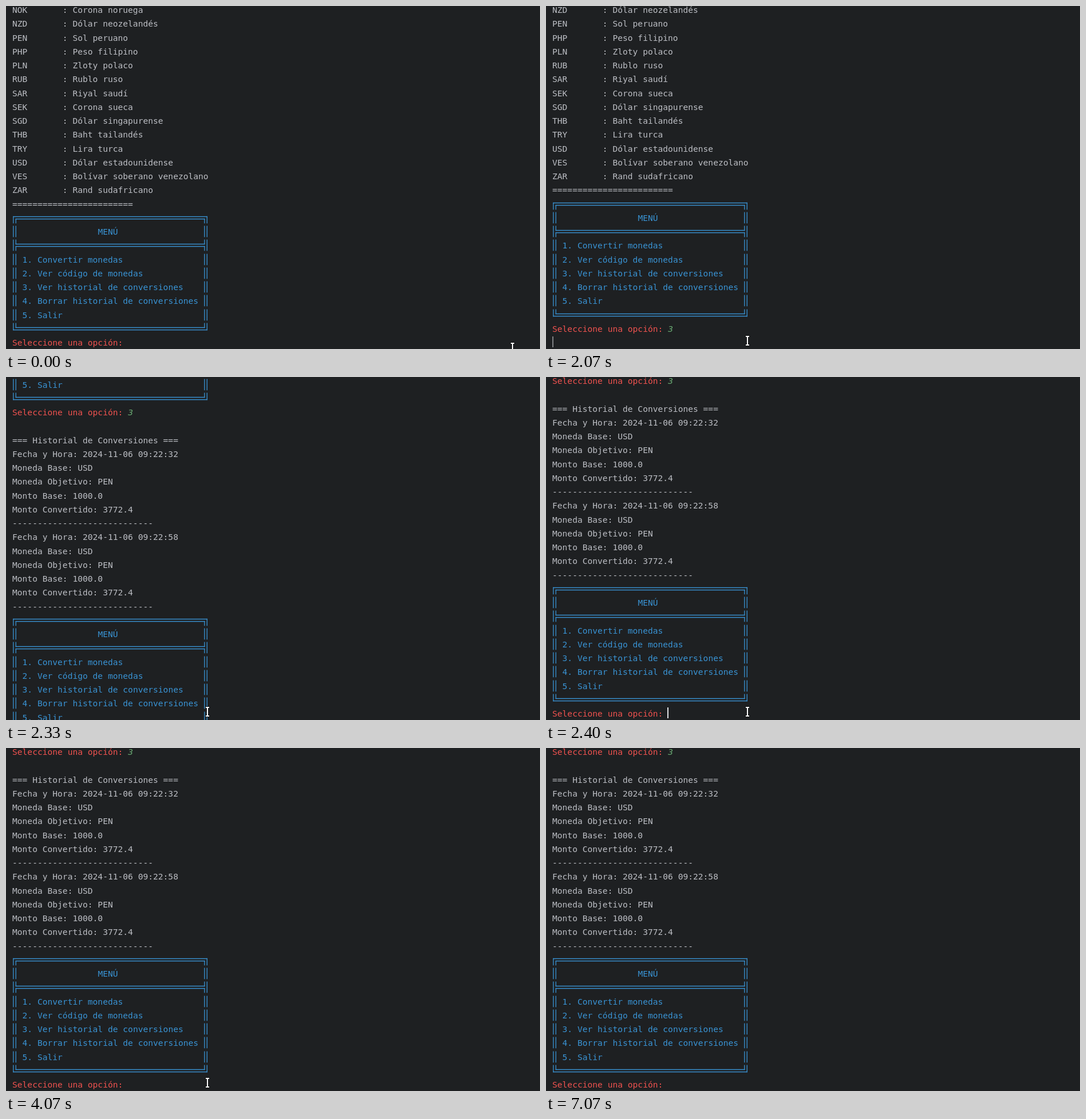
Recreate the animation shown at these times as an HTML page with a canvas. Size 933 by 600 pixels, loop 7.87 s.

```html
<!DOCTYPE html>
<html lang="es">
<head>
<meta charset="utf-8">
<title>Conversor de monedas</title>
<style>
  html, body { margin: 0; width: 100%; height: 100%; overflow: hidden; background: #1e2022; }
  canvas { display: block; }
</style>
</head>
<body>
<canvas id="stage" width="933" height="600"></canvas>
<script>
const ctx = document.getElementById('stage').getContext('2d');
const LOOP = 7870, TICK = 1000 / 15;
const LEFT = 11, CELL = 8.79, LINE = 24.25;
const FONT = '14.6px "DejaVu Sans Mono", monospace';
const COLOR = {
  back: '#1e2022', text: '#bcbec4', menu: '#3993d4',
  prompt: '#f0524f', input: '#6aab73', caret: '#dfe1e5'
};

const currencies = [
  'NOK Corona noruega', 'NZD Dólar neozelandés', 'PEN Sol peruano', 'PHP Peso filipino',
  'PLN Zloty polaco', 'RUB Rublo ruso', 'SAR Riyal saudí', 'SEK Corona sueca',
  'SGD Dólar singapurense', 'THB Baht tailandés', 'TRY Lira turca',
  'USD Dólar estadounidense', 'VES Bolívar soberano venezolano', 'ZAR Rand sudafricano'
].map(entry => entry.slice(0, 3).padEnd(10) + ': ' + entry.slice(4));

const record = time => [
  'Fecha y Hora: 2024-11-06 ' + time, 'Moneda Base: USD', 'Moneda Objetivo: PEN',
  'Monto Base: 1000.0', 'Monto Convertido: 3772.4', '-'.repeat(28)
];

const plain = lines => lines.map(text => ({ text, color: COLOR.text }));
const rule = edge => ({ edge });
const side = (text, col = 2) => ({ edge: 'side', text, col, color: COLOR.menu });
const menu = [
  rule('top'), side('MENÚ', 17), rule('middle'),
  side('1. Convertir monedas'), side('2. Ver código de monedas'),
  side('3. Ver historial de conversiones'), side('4. Borrar historial de conversiones'),
  side('5. Salir'), rule('bottom')
];
const prompt = { text: 'Seleccione una opción:', color: COLOR.prompt };

const rows = [
  ...plain(currencies), ...plain(['='.repeat(24)]), ...menu, prompt,
  ...plain(['', '=== Historial de Conversiones ===', ...record('09:22:32'), ...record('09:22:58')]),
  ...menu, prompt
];
const FIRST_PROMPT = 24, LAST_PROMPT = rows.length - 1, PROMPT_COL = 23;

function write(text, col, y, color, style = '') {
  ctx.font = style + FONT;
  ctx.fillStyle = color;
  ctx.fillText(text, LEFT + col * CELL, y + 5);
}

function drawEdge(edge, y) {
  const bar = (x, top, bottom) => ctx.fillRect(x, top, 1.3, bottom - top);
  const beam = (x1, x2, at) => ctx.fillRect(x1, at, x2 - x1, 1.4);
  const top = y - 10.5, bottom = y + 9.3;
  const upper = y - 3.2, lower = y + 0.9;
  const outer = [12.2, 350.6], inner = [16.6, 346.2];
  ctx.fillStyle = COLOR.menu;
  if (edge === 'side') {
    [...outer, ...inner].forEach(x => bar(x, top, bottom));
    return;
  }
  const opens = edge !== 'bottom', closes = edge !== 'top';
  outer.forEach(x => bar(x, closes ? top : upper, opens ? bottom : lower + 1.4));
  if (opens) inner.forEach(x => bar(x, lower, bottom));
  if (closes) inner.forEach(x => bar(x, top, upper + 1.4));
  const span = wide => wide ? [12.2, 351.9] : [16.6, 347.5];
  beam(...span(edge === 'top'), upper);
  beam(...span(edge === 'bottom'), lower);
}

function drawCaret(col, y) {
  ctx.fillStyle = COLOR.caret;
  if (col === 0) ctx.fillRect(11.5, y - 11, 1, 19);
  else ctx.fillRect(Math.floor(10.6 + col * CELL), y - 11, 2, 19);
}

function drawPointer(x, y) {
  const shape = grow => {
    ctx.fillRect(x - 1 - grow, y - 8 - grow, 2 + 2 * grow, 17 + 2 * grow);
    for (const end of [y - 8, y + 7]) {
      ctx.fillRect(x - 3 - grow, end - grow, 6 + 2 * grow, 2 + 2 * grow);
    }
  };
  ctx.fillStyle = '#0c0d0e';
  shape(0.6);
  ctx.fillStyle = '#fff';
  shape(0);
}

// Distance still to scroll, in pixels, before the last prompt is in place.
function remaining(t) {
  if (t < 2270) return 23 * LINE;
  if (t < 2330) return 225;
  return t < 2400 ? 55 : 0;
}

function scrollAt(t) {
  return t < 2070 ? 0 : 24 * LINE - remaining(t);
}

function caretOn(t) {
  const toggles = [530, 1000, 1070, 3070, 3530, 4070, 4530, 5070, 5530, 6070, 6600, 7070];
  return toggles.filter(at => t >= at).length % 2 === 1;
}

function pointerAt(t) {
  const step = Math.floor((t + 5) / TICK);
  const p = Math.min(1, step / 7);
  const eased = p * p * (3 - 2 * p);
  return [885 - 533 * eased, Math.round(597 - 12 * eased)];
}

function draw(t) {
  ctx.fillStyle = COLOR.back;
  ctx.fillRect(0, 0, 933, 600);

  const scroll = scrollAt(t);
  const rowY = i => Math.round(7 + i * LINE - scroll);
  const last = t < 2270 ? FIRST_PROMPT : LAST_PROMPT;
  rows.slice(0, last + 1).forEach((row, i) => {
    const y = rowY(i);
    if (y < -20 || y > 620) return;
    if (row.edge) drawEdge(row.edge, y);
    if (row.text) write(row.text, row.col || 0, y, row.color);
  });
  if (t >= 1070) write('3', PROMPT_COL, rowY(FIRST_PROMPT), COLOR.input, 'italic ');

  if (caretOn(t)) {
    if (t >= 2270) drawCaret(PROMPT_COL, rowY(LAST_PROMPT));
    else if (t >= 2070) drawCaret(0, rowY(FIRST_PROMPT + 1));
    else drawCaret(PROMPT_COL + (t >= 1070 ? 1 : 0), rowY(FIRST_PROMPT));
  }
  if (t < 5600) {
    const [x, y] = pointerAt(t);
    drawPointer(Math.round(x), y + (t >= 5470 ? 2 : 0));
  }
}

const start = performance.now();
function frame() {
  draw((performance.now() - start) % LOOP);
  requestAnimationFrame(frame);
}
frame();
</script>
</body>
</html>
```
